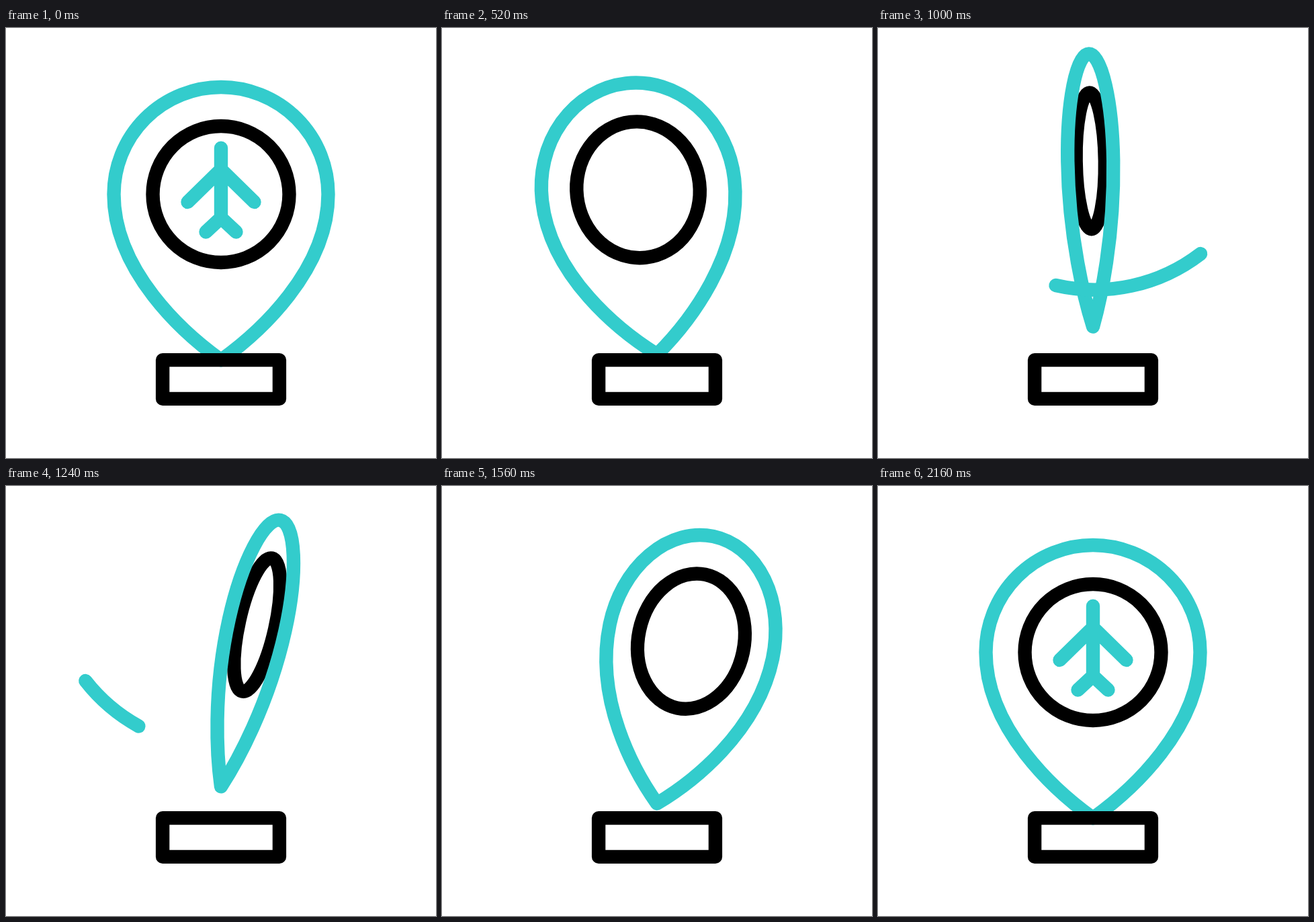
Animation, 640 px wide and 640 px high, one loop 2240 ms. Source, as an HTML page with a canvas:

```html
<!DOCTYPE html>
<html lang="en">
<head>
<meta charset="utf-8">
<title>Map pin</title>
<style>
html, body { margin: 0; width: 100%; height: 100%; overflow: hidden; background: #fff; }
canvas { display: block; width: 100vw; height: 100vh; }
</style>
</head>
<body>
<canvas id="stage"></canvas>
<script>
const SIZE = 640, LOOP = 2240, STEP = 40, LAST = 2160;
const TEAL = '#33cccc', BLACK = '#000';
const TIP_X = 320, TIP_Y = 494.2, HEAD = -246.7;
const RAD = Math.PI / 180;

const canvas = document.getElementById('stage');
const ctx = canvas.getContext('2d');
const dpr = window.devicePixelRatio || 1;
canvas.width = canvas.height = SIZE * dpr;

// ease-in-out: cubic-bezier(.42, 0, .58, 1)
function ease(x) {
  if (x <= 0) return 0;
  if (x >= 1) return 1;
  let lo = 0, hi = 1;
  for (let i = 0; i < 30; i++) {
    const u = (lo + hi) / 2, v = 1 - u;
    if (1.26 * u * v * v + 1.74 * u * u * v + u * u * u < x) lo = u;
    else hi = u;
  }
  return lo * lo * (3 - 2 * lo);
}

// keys: [time, value] pairs, eased between neighbours
function track(keys, t) {
  let value = keys[0][1];
  for (let i = 1; i < keys.length; i++) {
    const [t0, v0] = keys[i - 1], [t1, v1] = keys[i];
    if (t >= t0) value = v0 + (v1 - v0) * ease((t - t0) / (t1 - t0));
  }
  return value;
}

const turn = [[256, 1], [1956, -1]];
const lift = [[332, 0], [995, -49.7], [1093, -49.7], [1963, 0]];
const tilt = [[355, 0], [692, -13.5], [1336, 13.8], [1425, 13.8], [1950, 0]];
const planeOut = [[0, 0], [680, -200]];
const planeIn = [[1417, 200], [2160, 0]];
const trailHead = [[682, 49.7], [1242, -52]];
const trailTail = [[865, 49.7], [1425, -52]];

function stroke(path, color) {
  ctx.strokeStyle = color;
  ctx.stroke(path);
}

function placed(path, matrix) {
  const out = new Path2D();
  out.addPath(path, matrix);
  return out;
}

// local shapes have the pin's tip at 0,0
const pin = new Path2D();
pin.moveTo(0, 0);
pin.bezierCurveTo(-56, -40, -159.5, -133, -159.5, HEAD);
pin.arc(0, HEAD, 159.5, Math.PI, 2 * Math.PI);
pin.bezierCurveTo(159.5, -133, 56, -40, 0, 0);
pin.closePath();

const ring = new Path2D();
ring.arc(0, HEAD, 101.5, 0, 2 * Math.PI);
ring.closePath();

const plane = new Path2D('M320 178.8V282.5M270.5 259L320 210.5L369.5 259M297.5 303.5L320 282.5L342.5 303.5');
const base = new Path2D('M233.1 494.1H406.9V551.9H233.1Z');

function draw(t) {
  ctx.setTransform(dpr, 0, 0, dpr, 0, 0);
  ctx.fillStyle = '#fff';
  ctx.fillRect(0, 0, SIZE, SIZE);
  ctx.lineWidth = 20.4;
  ctx.lineCap = ctx.lineJoin = 'round';

  const angle = track(tilt, t) * RAD, sx = track(turn, t);
  const cos = Math.cos(angle), sin = Math.sin(angle);
  const pose = new DOMMatrix([sx * cos, sx * sin, -sin, cos, TIP_X, TIP_Y + track(lift, t)]);
  const hoop = placed(ring, pose);

  const shift = t < 1000 ? track(planeOut, t) : track(planeIn, t);
  ctx.save();
  ctx.clip(hoop);
  ctx.translate(0, shift);
  stroke(plane, TEAL);
  ctx.restore();

  stroke(hoop, BLACK);
  stroke(placed(pin, pose), TEAL);

  const head = track(trailHead, t), tail = track(trailTail, t);
  if (tail - head > 0.05) {
    const trail = new Path2D();
    trail.arc(322.4, 130.6, 259, (90 - tail) * RAD, (90 - head) * RAD);
    stroke(trail, TEAL);
  }

  stroke(base, BLACK);
}

const start = performance.now();
function tick() {
  const t = (performance.now() - start) % LOOP;
  draw(Math.min(Math.floor(t / STEP) * STEP, LAST));
  requestAnimationFrame(tick);
}
tick();
</script>
</body>
</html>
```
